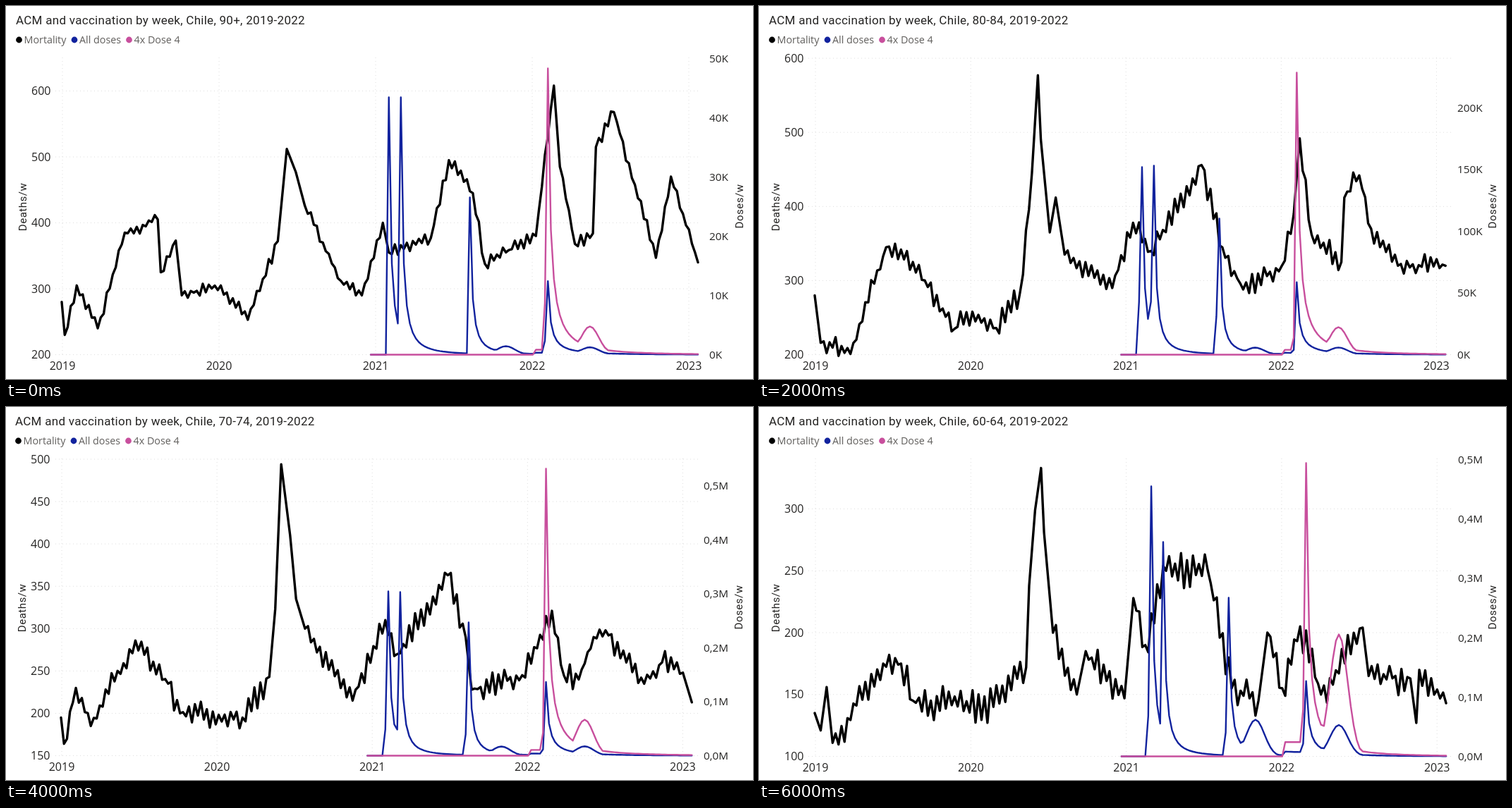
Write an HTML page that moves like this. It is 1059x529 px and loops after 7000 ms.

```html
<!DOCTYPE html>
<html lang="en">
<head>
<meta charset="utf-8">
<title>Mortality and vaccination by age group</title>
<style>
  html, body { margin: 0; width: 100%; height: 100%; overflow: hidden; background: #fff; }
  svg { display: block; }
  text { font: 16px "Open Sans", sans-serif; fill: #252423; }
  .title { font: 17px Roboto, sans-serif; letter-spacing: .28px; }
  .axis { font: 15px Roboto, sans-serif; letter-spacing: .5px; text-anchor: middle; }
  .legend { font-size: 14.3px; fill: #605e5c; }
  .left { text-anchor: end; }
  .year { text-anchor: middle; }
  .right { font-size: 15.3px; }
  .grid { stroke: #dedede; stroke-dasharray: 1 4; }
  polyline { fill: none; stroke-linejoin: round; stroke-linecap: round; }
</style>
</head>
<body>
<svg id="stage" width="1059" height="529" viewBox="0 0 1059 529"></svg>
<script>
const BLACK = '#000', BLUE = '#12239e', PINK = '#c84f9d';
const FRAME_MS = 1000, LAST_WEEK = 212, FIRST_DOSE_WEEK = 103;

// left: [lowest, highest, step, pixels per death]; right: [highest, step, pixels per step]
// trend: [week, deaths] at the main turns; noise: weekly scatter in pixels
// pulses: [week, pixel height] of doses 1-3, lead: share given one week early
// fourth: [week, pixel height, lead, height of the later wave]; autumn: height of the small 2021 wave
const charts = [
  { ages: '90+', left: [200, 600, 100, .935], right: [50, 10, 84.1], unit: 'K', yearStep: 222, rightX: 997, noise: 10,
    trend: [[0, 280], [1, 230], [5, 305], [12, 240], [21, 385], [32, 405], [33, 325], [38, 373], [40, 290], [53, 305], [62, 253], [72, 372], [75, 512], [78, 477], [81, 426], [93, 312], [100, 290], [107, 400], [109, 355], [123, 377], [129, 495], [137, 445], [141, 338], [158, 380], [164, 608], [166, 485], [171, 368], [177, 384], [178, 515], [184, 568], [198, 347], [203, 470], [212, 340]],
    pulses: [[109, 365], [113, 365], [136, 223]], lead: 0, fourth: [162, 406, .18, 40], autumn: 12 },
  { ages: '85-89', left: [200, 550, 50, 1.2014], right: [120, 20, 70.1], unit: 'K', noise: 20,
    trend: [[0, 256], [8, 219], [17, 280], [20, 361], [29, 350], [45, 265], [53, 304], [58, 219], [69, 268], [73, 386], [75, 541], [76, 467], [78, 386], [87, 320], [96, 256], [115, 325], [130, 467], [138, 289], [152, 300], [159, 312], [164, 493], [168, 350], [171, 280], [177, 340], [178, 393], [185, 466], [187, 362], [206, 330], [208, 247], [210, 296], [212, 272]],
    pulses: [[109, 272], [113, 268], [136, 205]], lead: 0, fourth: [162, 403, .08, 38], autumn: 10 },
  { ages: '80-84', left: [200, 600, 100, 1.051], right: [200, 50, 87.6], unit: 'K', noise: 17,
    trend: [[0, 280], [2, 216], [12, 201], [24, 345], [33, 325], [47, 235], [53, 258], [61, 236], [69, 284], [73, 445], [75, 577], [76, 490], [79, 365], [81, 412], [84, 335], [100, 290], [107, 378], [113, 340], [130, 456], [137, 345], [144, 288], [157, 320], [161, 390], [163, 492], [167, 362], [177, 325], [178, 412], [183, 442], [187, 370], [196, 320], [212, 320]],
    pulses: [[110, 266], [114, 268], [136, 193]], lead: .28, fourth: [162, 400, .06, 39], autumn: 10 },
  { ages: '75-79', left: [200, 550, 50, 1.2014], right: [4, 1, 105.1], unit: 'M', noise: 20,
    trend: [[0, 266], [2, 207], [10, 214], [25, 330], [34, 270], [40, 324], [42, 235], [52, 255], [62, 222], [71, 295], [74, 533], [75, 533], [78, 380], [81, 310], [88, 320], [100, 270], [108, 348], [111, 300], [129, 426], [134, 330], [144, 275], [159, 300], [163, 399], [172, 290], [178, 375], [183, 390], [187, 310], [195, 325], [212, 267]],
    pulses: [[110, 272], [114, 274], [137, 173]], lead: .2, fourth: [163, 403, .33, 44], autumn: 11 },
  { ages: '70-74', left: [150, 500, 50, 1.2014], right: [5, 1, 76.6], unit: 'M', shift: -1, noise: 19,
    trend: [[0, 195], [1, 164], [5, 230], [10, 185], [25, 286], [36, 235], [40, 200], [61, 195], [70, 243], [72, 323], [74, 494], [77, 410], [79, 335], [82, 300], [98, 215], [109, 310], [113, 270], [130, 363], [136, 290], [138, 228], [155, 245], [165, 321], [169, 245], [174, 240], [179, 290], [184, 292], [196, 235], [202, 260], [209, 248], [212, 213]],
    pulses: [[110, 233], [114, 232], [137, 189]], lead: .16, fourth: [163, 407, .08, 51], autumn: 13 },
  { ages: '65-69', left: [100, 400, 50, 1.4017], right: [4, 1, 93.4], unit: 'M', noise: 20,
    trend: [[0, 153], [4, 184], [17, 165], [19, 206], [28, 200], [38, 200], [48, 137], [52, 186], [59, 155], [64, 200], [67, 160], [71, 222], [73, 337], [75, 380], [77, 348], [79, 280], [86, 205], [101, 190], [114, 245], [118, 290], [131, 303], [134, 240], [145, 190], [157, 210], [163, 284], [164, 284], [166, 215], [180, 260], [199, 215], [210, 217], [211, 179], [212, 176]],
    pulses: [[111, 388], [115, 393], [138, 174]], lead: .25, fourth: [164, 396, .44, 108], autumn: 30 },
  { ages: '60-64', left: [100, 300, 50, 1.755], right: [5, 1, 84.2], unit: 'M', base: 495.5, yearStep: 220.3, rightX: 991, noise: 26,
    trend: [[0, 135], [2, 121], [4, 156], [6, 111], [23, 175], [29, 175], [33, 145], [60, 140], [71, 172], [72, 238], [74, 299], [76, 333], [77, 281], [80, 200], [88, 150], [91, 185], [104, 147], [107, 228], [111, 190], [118, 250], [132, 250], [140, 155], [149, 145], [152, 200], [157, 155], [163, 205], [170, 150], [184, 204], [186, 165], [200, 163], [202, 127], [203, 170], [212, 143]],
    pulses: [[113, 383], [117, 304], [139, 225]], lead: .15, fourth: [165, 416, .16, 173], autumn: 52 }
];

const random = seed => Math.abs(Math.sin(seed * 127.1) * 43758.5 % 1);
const bell = (distance, width) => Math.exp(-((distance / width) ** 2) / 2);

// Deaths follow straight trends with a seeded up-and-down scatter on weeks between the turns.
function deathsAt(week, { trend, noise, left: [, , , scale] }) {
  const next = Math.max(1, trend.findIndex(([w]) => w >= week));
  const [w0, v0] = trend[next - 1], [w1, v1] = trend[next];
  const value = v0 + (v1 - v0) * (week - w0) / (w1 - w0);
  const scattered = week !== w0 && week !== w1 && w1 - w0 > 3;
  const sign = week % 2 ? 1 : -1;
  return value + (scattered ? sign * random(week + noise) * noise / scale : 0);
}

// A vaccination campaign peaks sharply and fades along a power curve.
function campaign(distance, height, lead, power) {
  if (distance < 0) return distance === -1 ? height * lead : 0;
  return height * (1 + distance) ** -power * Math.exp(-distance / 30);
}

function fourthDose(week, { fourth: [peak, height, lead, wave] }) {
  if (week < 158) return 0;
  const start = week < peak ? 3 + wave * .1 : 0;
  return Math.max(start, campaign(week - peak, height, lead, 1.15), wave * bell(week - 176, 3));
}

// The fourth dose is drawn enlarged four times, so it adds a quarter of its height to the total.
function allDoses(week, chart) {
  const early = chart.pulses.map(([peak, height]) => campaign(week - peak, height, chart.lead, 1.45));
  return Math.max(...early, chart.autumn * bell(week - 148, 3)) + fourthDose(week, chart) * .255;
}

const text = (cls, x, y, str) => `<text class="${cls}" x="${x}" y="${y}">${str}</text>`;
const gridLine = (x1, y1, x2, y2) => `<line class="grid" x1="${x1}" y1="${y1}" x2="${x2}" y2="${y2}"/>`;
const sideTitle = (x, y, str) =>
  `<text class="axis" transform="translate(${x} ${y}) rotate(-90)">${str}</text>`;

function render(chart) {
  const { ages, left, right, unit, base = 494.5, yearStep = 220.1, shift = 0, rightX = 990 + shift } = chart;
  const [low, high, step, scale] = left;
  const [top, rightStep, spacing] = right;

  let svg = text('title', 14 + shift, 26, `ACM and vaccination by week, Chile, ${ages}, 2019-2022`);
  [['Mortality', 18.5, BLACK], ['All doses', 97, BLUE], ['4x Dose 4', 174.5, PINK]].forEach(([name, x, color]) => {
    svg += `<circle cx="${x + shift}" cy="48" r="4.4" fill="${color}"/>` + text('legend', x + 7 + shift, 53, name);
  });
  for (let v = low; v <= high; v += step) {
    const y = base - (v - low) * scale;
    svg += gridLine(70, y, 985, y) + text('left', 63.5 + shift, y + 5.5, v);
  }
  for (let v = 0; v <= top; v += rightStep) {
    const label = unit === 'M' ? `0,${v}M` : `${v}K`;
    svg += text('right', rightX, base - v / rightStep * spacing + 5.5, label);
  }
  for (let i = 0; i < 5; i++) {
    const x = 80 + shift + i * yearStep;
    svg += gridLine(x, 73, x, base) + text('year', x, base + 21.5, 2019 + i);
  }
  svg += sideTitle(28.5 + shift, 285, 'Deaths/w') + sideTitle(1045 + shift, 284, 'Doses/w');

  const curve = (firstWeek, heightAt, color, width) => {
    const points = [];
    for (let week = firstWeek; week <= LAST_WEEK; week++) {
      points.push([79 + shift + week * yearStep / 52.18, base - heightAt(week, chart)]);
    }
    return `<polyline points="${points.join(' ')}" stroke="${color}" stroke-width="${width}"/>`;
  };
  return svg
    + curve(0, week => (deathsAt(week, chart) - low) * scale, BLACK, 3.4)
    + curve(FIRST_DOSE_WEEK, allDoses, BLUE, 2.4)
    + curve(FIRST_DOSE_WEEK, fourthDose, PINK, 2.4);
}

const stage = document.getElementById('stage');
const pictures = charts.map(render);
let shown = -1;

function tick() {
  const index = Math.floor(performance.now() / FRAME_MS) % pictures.length;
  if (index !== shown) stage.innerHTML = pictures[shown = index];
  requestAnimationFrame(tick);
}
tick();
</script>
</body>
</html>
```
